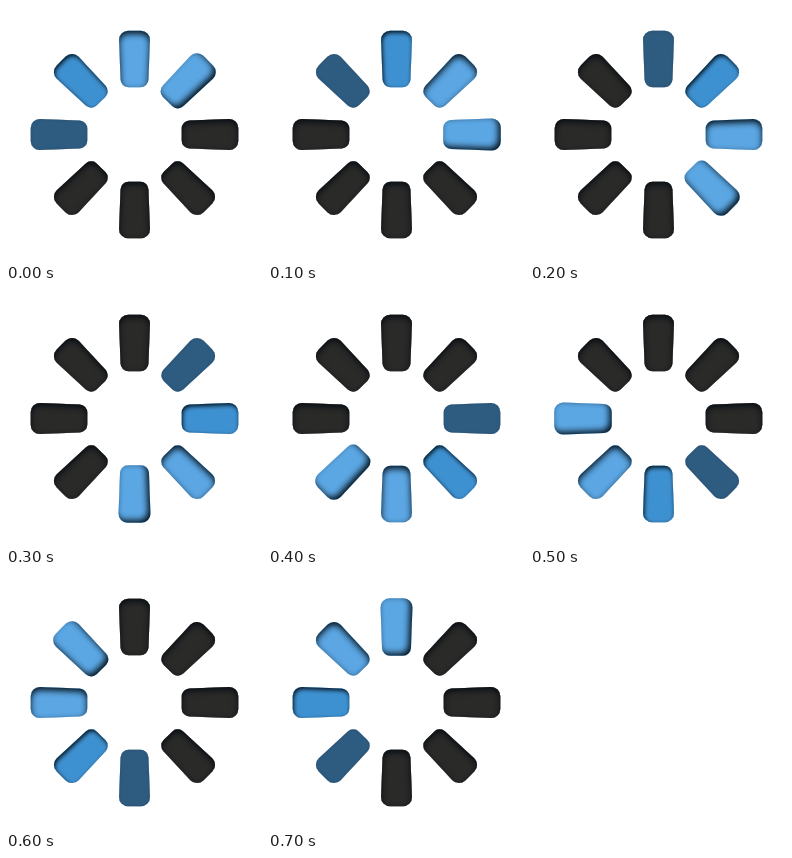
Recreate the animation shown at these times as an HTML page with a canvas. Size 256 by 256 pixels, loop 0.8 s.

```html
<!DOCTYPE html>
<html>
<head>
<meta charset="utf-8">
<style>
html, body { margin: 0; height: 100%; overflow: hidden; background: #fff; }
canvas { display: block; }
</style>
</head>
<body>
<canvas width="256" height="256"></canvas>
<script>
const ctx = document.querySelector('canvas').getContext('2d');
const BARS = 8, STEP = 100;

// Looks by steps since the bar was lit; the last one is the unlit bar.
// The inner shadow falls from the lower right on the head, from above on the rest.
const looks = [
  { fill: '#5ba7e4', alpha: 0.95, blur: 6, dx: -2.5, dy: -2.5, grow: 0.8 },
  { fill: '#5ba6e3', alpha: 0.95, blur: 6, dx: 0, dy: 3, grow: 0.3 },
  { fill: '#3e91d1', alpha: 0.95, blur: 4, dx: 1, dy: 2, grow: 0.3 },
  { fill: '#2e5b80', alpha: 0.15, blur: 3, dx: 0, dy: 0, grow: 0.3 },
  { fill: '#2a2a29', alpha: 0.9, blur: 6, dx: 0, dy: 2.5, grow: 0.3 }
];

// Rounded bar pointing up from the centre, wider at its outer end.
function barPath(grow) {
  const top = -103.5 - grow, bottom = -47.5 + grow;
  const outer = 15.5 + grow, inner = 13.4 + grow;
  const path = new Path2D();
  path.moveTo(0, top);
  path.arcTo(outer, top, inner, bottom, 9);
  path.arcTo(inner, bottom, -inner, bottom, 8);
  path.arcTo(-inner, bottom, -outer, top, 8);
  path.arcTo(-outer, top, 0, top, 9);
  path.closePath();
  return path;
}

function drawBar(index, look) {
  const path = barPath(look.grow);
  const outside = new Path2D();
  outside.rect(-60, -150, 120, 150);
  outside.addPath(path);

  ctx.save();
  ctx.translate(128.5, 128.5);
  ctx.rotate(index * 2 * Math.PI / BARS);
  ctx.fillStyle = look.fill;
  ctx.fill(path);
  ctx.clip(path);
  ctx.shadowColor = `rgba(0, 8, 14, ${look.alpha})`;
  ctx.shadowBlur = look.blur;
  ctx.shadowOffsetX = look.dx;
  ctx.shadowOffsetY = look.dy;
  ctx.fillStyle = look.fill;
  ctx.fill(outside, 'evenodd');
  ctx.restore();
}

function draw() {
  const head = Math.floor(performance.now() / STEP) + 1;
  ctx.fillStyle = '#fff';
  ctx.fillRect(0, 0, 256, 256);
  for (let i = 0; i < BARS; i++) {
    const age = (head - i + BARS) % BARS;
    drawBar(i, looks[Math.min(age, 4)]);
  }
  requestAnimationFrame(draw);
}
draw();
</script>
</body>
</html>
```
